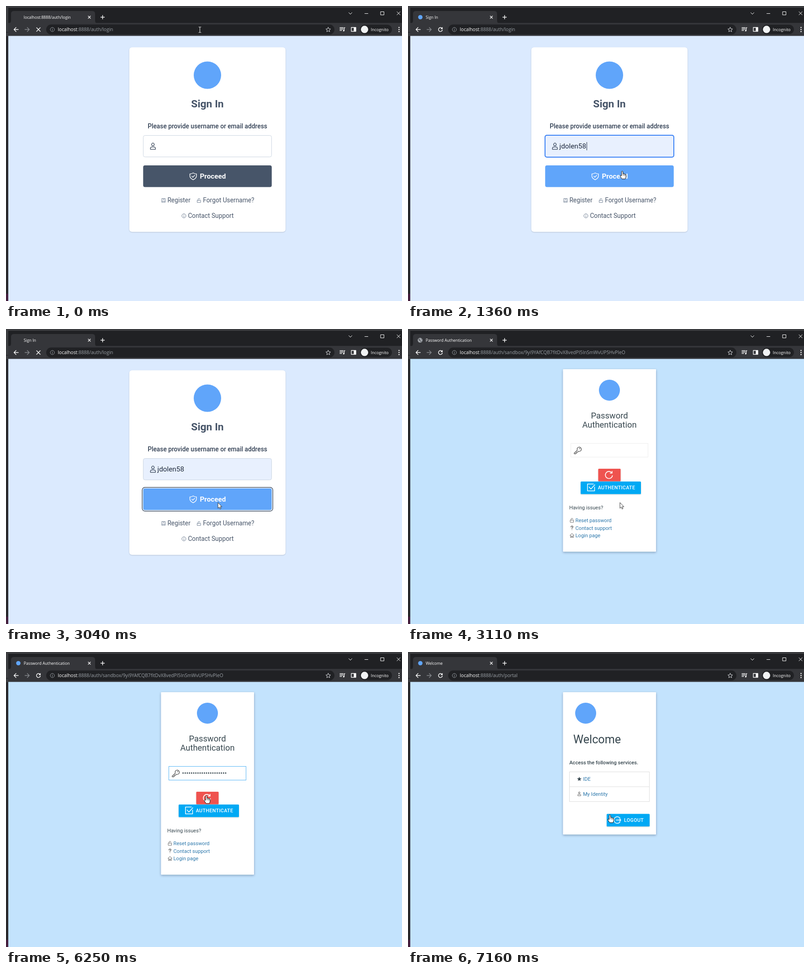
Recreate the animation shown at these times as an HTML page. Size 867 by 646 pixels, loop 8 s.

```html
<!DOCTYPE html>
<html lang="en">
<head>
<meta charset="utf-8">
<title>Sign-in flow</title>
<style>
html, body { margin: 0; width: 100%; height: 100%; overflow: hidden; background: #3c3d40; }
svg { display: block; width: 867px; height: 646px; }
text { font-family: Roboto, sans-serif; white-space: pre; }
.ui { font-family: "Open Sans", "Noto Sans", sans-serif; font-size: 8.7px; font-weight: 500; fill: #fff; }
.line { fill: none; stroke-linecap: round; stroke-linejoin: round; }
.mid { text-anchor: middle; }
.caps { font-size: 10.7px; font-weight: 500; letter-spacing: .38px; fill: #fff; }
.body { font-size: 11.1px; fill: #37474f; }
.link { font-size: 11.1px; fill: #2b77ab; }
.slate { font-size: 13.77px; fill: #475569; }
</style>
</head>
<body>
<svg id="stage" viewBox="0 0 867 646" xmlns="http://www.w3.org/2000/svg"></svg>
<script>
const LOOP = 8000, STEP = 70;
const USER = 'jdolen58';
const BLUE = '#60a5fa', SLATE = '#475569', SKY = '#03a9f4';

const rect = (x, y, w, h, fill, extra = '') =>
  `<rect x="${x}" y="${y}" width="${w}" height="${h}" fill="${fill}" ${extra}/>`;
const disc = (x, y, r, fill, extra = '') =>
  `<circle cx="${x}" cy="${y}" r="${r}" fill="${fill}" ${extra}/>`;
const line = (d, color, width = 1.2, extra = '') =>
  `<path class="line" d="${d}" stroke="${color}" stroke-width="${width}" ${extra}/>`;
const text = (x, y, cls, str, extra = '') =>
  `<text x="${x}" y="${y}" class="${cls}" ${extra}>${str}</text>`;
const group = (id, body) => `<g id="${id}">${body}</g>`;
const at = (x, y, body) => `<g transform="translate(${x} ${y})">${body}</g>`;
const backdrop = fill => rect(5, 65.5, 862, 580.5, fill);

const person = (x, y, k, color, width) => at(x, y,
  line(`M${-2.9 * k} ${-4 * k}a${2.9 * k} ${3.2 * k} 0 1 0 ${5.8 * k} 0a${2.9 * k} ${3.2 * k} 0 1 0 ${-5.8 * k} 0
    M${-5.6 * k} ${6.8 * k}V${5 * k}Q${-5.6 * k} ${1.5 * k} ${-2 * k} ${1.5 * k}H${2 * k}
    Q${5.6 * k} ${1.5 * k} ${5.6 * k} ${5 * k}V${6.8 * k}Z`, color, width));
const padlock = (x, y, color) => at(x, y, line('M-3.5 -.5H3.5V4.2H-3.5ZM-2 -.5V-2.5Q-2 -4.5 0 -4.5Q2 -4.5 2 -2.7', color, .9));
const infoMark = (x, y, r, color) =>
  disc(x, y, r, 'none', `stroke="${color}"`) + line(`M${x} ${y - .3}v2.4M${x} ${y - 2.3}v.1`, color, 1);

function browserFrame() {
  const ink = '#fff', dim = '#85888c';
  return rect(0, 0, 867, 646, '#3c3d40') + rect(0, 66, 5, 580, '#2a2a2d') +
    rect(0, 57, 5, 1, '#202124') + rect(0, 630, 5, 16, '#46213f') +
    rect(5, 4, 862, 34, '#202124') + rect(5, 37, 862, 29, '#35363a') +
    '<path d="M5 38Q11 38 11 32V17Q11 11 17 11H189Q195 11 195 17V32Q195 38 201 38Z" fill="#35363a"/>' +
    line('M180 22l5 5m0-5l-5 5', ink, 1.2) + line('M207.5 24.5h8m-4-4v8', ink, 1.4) +
    line('M750.5 14.5l3.5 3.5 3.5-3.5M785.5 16.5h7M820.5 12.5h7v7h-7zM856 12.5l7 7m0-7l-7 7', ink, 1) +
    line('M27 51.5H17.5M22 47l-4.5 4.5 4.5 4.5', ink, 1.4) +
    line('M41.5 51.5H51M46.5 47l4.5 4.5-4.5 4.5', dim, 1.4) +
    group('stop', line('M67 47.5l8 8m0-8l-8 8', ink, 1.4)) +
    group('reload', line('M74.8 49.5A4.3 4.3 0 1 0 75.2 52.5', ink, 1.4) +
      '<path d="M75.8 46v4.600h-4.600z" fill="#fff"/>') +
    rect(88, 40.5, 631, 22, '#202124', 'rx="11"') + infoMark(101.5, 51.5, 4.5, '#9aa0a6') +
    text(113.5, 55, 'ui', 'localhost<tspan id="path" font-weight="400" fill="#9aa0a6"></tspan>', 'style="font-size:10.2px"') +
    line('M705.5 46.5l1.500 3.400 3.700.4-2.800 2.400.8 3.600-3.200-1.900-3.200 1.900.8-3.600-2.800-2.400 3.700-.4z', '#dadce0', 1) +
    line('M731 47.5h7.5M731 50.5h7.5M731 53.5h4M740.5 54v-6.5h1.5', ink, 1.3) + disc(739.3, 54, 1.6, ink) +
    line('M756 47h10v8.5h-10z', ink, 1.3) + rect(761.5, 47, 4.5, 8.5, ink) +
    rect(775, 41, 70, 20.5, '#202124', 'rx="10"') + disc(785, 51.3, 8, '#f1f3f4') +
    text(798.7, 54.6, 'ui', 'Incognito', 'style="font-size:9px"') +
    [47, 51.5, 56].map(y => disc(860.5, y, 1.3, ink)).join('') +
    group('favicon', disc(27, 24.5, 4.8, BLUE)) +
    group('globe', disc(26.5, 24.5, 5.2, '#a4a8ad') +
      '<path d="M23 21l3 .5-.5 2 2 1-1 2-2.500-1.500zM28 20.500l2.500 2-1 1zM27 26l3 .5-2 2.500z" fill="#55585c"/>') +
    text(38.7, 27.6, 'ui', '', 'id="tab"');
}

function signInPage() {
  const icon = '#64748b';
  return backdrop('#dbeafe') +
    rect(270, 90.5, 342, 404, '#fff', 'rx="6" filter="url(#soft)"') +
    disc(441, 151.5, 30, BLUE) +
    text(441, 222, 'mid', 'Sign In', `font-size="22.95" font-weight="700" fill="${SLATE}"`) +
    text(441, 268, 'mid', 'Please provide username or email address', 'font-size="13.77" font-weight="500" fill="#334155"') +
    rect(300.5, 283.5, 281, 47, '#fff', 'id="userBox" rx="4" stroke="#cbd5e1"') +
    rect(300, 283, 282, 48, 'none', 'id="userFocus" rx="4" stroke="#3b82f6" stroke-width="2"') +
    person(321.7, 307.2, .98, '#334155', 1.3) +
    text(331.5, 312.3, '', USER, 'id="userText" font-size="15.3" fill="#1e293b"') +
    rect(391, 298, 1, 18, '#1e293b', 'id="userCaret"') +
    rect(298.2, 346.7, 286, 52, '#fff', `id="ring" rx="6" stroke="${SLATE}" stroke-width="1.5"`) +
    rect(300.3, 349, 281.5, 47.5, SLATE, 'id="proceed" rx="4"') +
    line('M409.8 365.5Q413 367.8 417 367.8V372Q417 377.5 409.8 380.5Q402.6 377.5 402.6 372V367.8Q406.5 367.8 409.8 365.5ZM406.8 372.8l2.300 2.300 4-4.300', '#fff', 1.4) +
    text(424.5, 378.2, '', 'Proceed', 'font-size="15.3" font-weight="700" fill="#fff"') +
    line('M341.5 421.5h7v8.5h-7zM341.5 427.5h7M343.5 423.5h3', icon, .9) +
    text(353.4, 430.2, 'slate', 'Register') +
    padlock(422.5, 426, icon) + text(431.3, 430.2, 'slate', 'Forgot Username?') +
    infoMark(389.5, 459.5, 4.4, icon) + text(398.4, 464, 'slate', 'Contact Support');
}

const paleCard = h => backdrop('#c3e3fd') +
  rect(339.5, 88, 203.5, h, '#fff', 'rx="1" filter="url(#deep)"');
const raised = (x, y, w, h, fill) => rect(x, y, w, h, fill, 'rx="1.5" filter="url(#soft)"');

function passwordPage() {
  const gray = '#616161';
  const dots = Array.from({ length: 21 }, (_, i) => disc(387.7 + i * 4.66, 265, 1.5, '#37474f')).join('');
  return paleCard(399.5) + disc(441, 134, 23, BLUE) +
    ['Password', 'Authentication'].map((s, i) =>
      text(441, 196 + i * 20, 'mid', s, 'font-size="18.36" fill="#37474f"')).join('') +
    rect(356.5, 250.5, 169, 30, '#fff', 'id="passBox"') +
    line('M370.7 265.5A4.7 4.7 0 1 1 373.5 267.8L371.5 269.5H369.5V271.5H367.5V273.5H364V271.8Z', '#424242', 1.2) +
    disc(375.8, 262, 1, '#424242') +
    group('dots', dots) + rect(385, 257, 1, 17, '#333', 'id="passCaret"') +
    raised(416.5, 306, 49, 27.5, '#ef5350') +
    line('M446 314.8A7.8 7.8 0 1 0 447.6 321M446.8 311.5V315.8H442.5', '#fff', 1.6) +
    raised(378, 334, 132, 27.5, SKY) +
    line('M408.5 346V354.5H393V339.5H406M396.5 346l4 4.5 8.5-9.5', '#fff', 1.5) +
    text(415.7, 351, 'caps', 'AUTHENTICATE') +
    text(353, 395, 'body', 'Having issues?') +
    padlock(359, 419, gray) + text(366.6, 422.6, 'link', 'Reset password') +
    line('M356.8 433.5Q356.8 431.5 359 431.5Q361.2 431.5 361.2 433.2Q361.2 434.8 359 435.5V437M359 439.5v.1', gray, 1.4) +
    text(366.6, 439.5, 'link', 'Contact support') +
    line('M354.5 452l4.5-4.2 4.5 4.2M356 451.5v5h2v-3h2v3h2v-5', gray, 1) +
    text(366.6, 456.4, 'link', 'Login page');
}

function portalPage() {
  const star = Array.from({ length: 10 }, (_, i) => {
    const a = i * Math.PI / 5, r = i % 2 ? 2.2 : 5.2;
    return `${375 + r * Math.sin(a)},${278.3 - r * Math.cos(a)}`;
  }).join(' ');
  return paleCard(311.5) + disc(389, 134, 23, BLUE) +
    text(361.7, 200.3, '', 'Welcome', 'font-size="25.2" fill="#37474f"') +
    text(353.2, 245.6, 'body', 'Access the following services.', 'style="font-weight:500"') +
    rect(353.5, 262.5, 175, 65, '#fff', 'stroke="#ddd"') + rect(354, 294.5, 174, 1, '#ddd') +
    `<polygon points="${star}" fill="#37474f"/>` + text(383.2, 282, 'link', 'IDE') +
    person(375, 310.5, .58, '#616161', 1) + text(383.2, 314.6, 'link', 'My Identity') +
    raised(435, 354.5, 94, 27.5, SKY) +
    line('M464.3 364A7.3 7.3 0 1 0 464.3 372M456 368H466M463.5 365.5L466 368L463.5 370.5', '#fff', 1.5) +
    text(473, 371.7, 'caps', 'LOGOUT');
}

function cursors() {
  return '<g id="cursor">' +
    group('arrow', '<path d="M0 0V12.500L2.800 9.900 4.700 14.300 6.700 13.400 4.900 9.200H8.700Z" fill="#fff" stroke="#222" stroke-width=".9"/>') +
    group('hand', '<path d="M-1.500 11V1.500Q0 -.5 1.500 1.500V6Q3 5.200 4 6.800Q5.500 6 6.300 7.600Q8 7 8.400 9V13L6.800 17.800H-.5L-4.600 11.300Q-4.800 9.400 -3 10Z" fill="#fff" stroke="#111" stroke-width="1"/>' +
      line('M1.5 6v4M4 7v3.5M6.3 8v3', '#111', .7)) +
    group('beam', '<path class="line" id="beamLine" d="M-2.500 -5.500H-.8L0 -5L.8 -5.500H2.500M0 -5V6M-2.500 6.500H-.8L0 6L.8 6.500H2.500" stroke-width="1.1"/>') +
    '</g>';
}

const stage = document.getElementById('stage');
stage.innerHTML = `<defs>
  <filter id="soft" x="-10%" y="-10%" width="120%" height="130%"><feDropShadow dx="0" dy="1" stdDeviation="1" flood-color="#000" flood-opacity=".2"/></filter>
  <filter id="deep" x="-10%" y="-10%" width="120%" height="120%"><feDropShadow dx="0" dy="2" stdDeviation="2.5" flood-color="#123" flood-opacity=".32"/></filter>
  </defs>` + browserFrame() + group('signIn', signInPage()) + group('password', passwordPage()) +
  group('portal', portalPage()) + cursors();

const el = {};
stage.querySelectorAll('[id]').forEach(node => { el[node.id] = node; });
const show = (id, on) => { el[id].style.display = on ? '' : 'none'; };
const set = (id, attrs) => { for (const key in attrs) el[id].setAttribute(key, attrs[key]); };

// Tab states: start, title, icon, loading
const TABS = [
  [0, 'localhost:8888/auth/login', '', true],
  [60, 'Sign In', '', true],
  [130, 'Sign In', '', false],
  [200, 'Sign In', 'favicon', false],
  [2980, 'Sign In', '', true],
  [3110, 'Password Authentication', 'globe', false],
  [3220, 'Password Authentication', 'favicon', false],
  [6530, 'Password Authentication', '', true],
  [6810, 'Welcome', 'globe', false],
  [6950, 'Welcome', 'favicon', false]
];
const PAGES = [
  [0, 'signIn', ':8888/auth/login'],
  [3110, 'password', ':8888/auth/sandbox/9yi9YAfCQB7fitDvX8vedPI5InSmWvUP5HvPIeO'],
  [6810, 'portal', ':8888/auth/portal']
];
// Pointer moves: first step, last step, destination
const MOVES = [
  [730, 1010, 430, 308],
  [1220, 1360, 469, 361],
  [1430, 1500, 464, 370],
  [1570, 1640, 464, 380],
  [3550, 3970, 449.5, 274],
  [6250, 6250, 438.5, 314],
  [6320, 6460, 442, 356]
];
// Pointer zones: left, top, right, bottom, shape
const ZONES = {
  signIn: [[300, 283, 582, 331, 'beam'], [300, 349, 582, 397, 'hand']],
  password: [[356, 250, 526, 281, 'beam'], [416, 306, 466, 334, 'hand'], [378, 334, 510, 362, 'hand']],
  portal: [[435, 354, 529, 382, 'hand']]
};

const current = (list, t) => list.filter(item => item[0] <= t).pop();
const within = (t, ...spans) => spans.some(([a, b]) => t >= a && t < b);
const ease = u => u * u * (3 - 2 * u);

function pointer(t) {
  let x = 424.5, y = 51.5;
  for (const [start, end, toX, toY] of MOVES) {
    if (t < start) break;
    const taken = (Math.floor((t - start) / STEP) + 1) * STEP;
    const u = ease(Math.min(1, taken / (end - start + STEP)));
    x += (toX - x) * u;
    y += (toY - y) * u;
  }
  return { x, y };
}

function render(t) {
  const [, title, icon, loading] = current(TABS, t);
  const [, page, path] = current(PAGES, t);
  el.tab.textContent = title;
  el.path.textContent = path;
  show('favicon', icon === 'favicon');
  show('globe', icon === 'globe');
  show('stop', loading);
  show('reload', !loading);
  for (const name in ZONES) show(name, name === page);

  const submitted = t >= 2980;
  const { x, y } = pointer(t);
  const zone = ZONES[page].find(([l, top, r, b]) => x >= l && x <= r && y >= top && y <= b);
  const idle = page === 'signIn' && submitted;
  const shape = y < 63 ? 'beam' : zone && !idle ? zone[4] : 'arrow';
  ['arrow', 'hand', 'beam'].forEach(name => show(name, name === shape));
  set('cursor', { transform: `translate(${x} ${y})` });
  set('beamLine', { stroke: y < 66 ? '#e0e0e0' : '#333' });

  const filled = t >= 1150;
  set('userBox', { fill: filled ? '#e8f0fe' : '#fff' });
  show('userFocus', t >= 1080 && !submitted);
  show('userText', filled);
  show('userCaret', within(t, [1080, 1640], [2170, 2650]));
  set('userCaret', { x: filled ? 391 : 332 });
  set('proceed', { fill: zone && zone[4] === 'hand' ? BLUE : SLATE });
  show('ring', submitted);

  const typed = t >= 5320;
  set('passBox', { stroke: t >= 4040 ? '#55b5f5' : '#eee' });
  show('dots', typed);
  show('passCaret', within(t, [4040, 4570], [5050, 5920]));
  set('passCaret', { x: typed ? 483 : 385 });
}

const begin = performance.now();
function tick() {
  render((performance.now() - begin) % LOOP);
  requestAnimationFrame(tick);
}
render(0);
requestAnimationFrame(tick);
</script>
</body>
</html>
```
